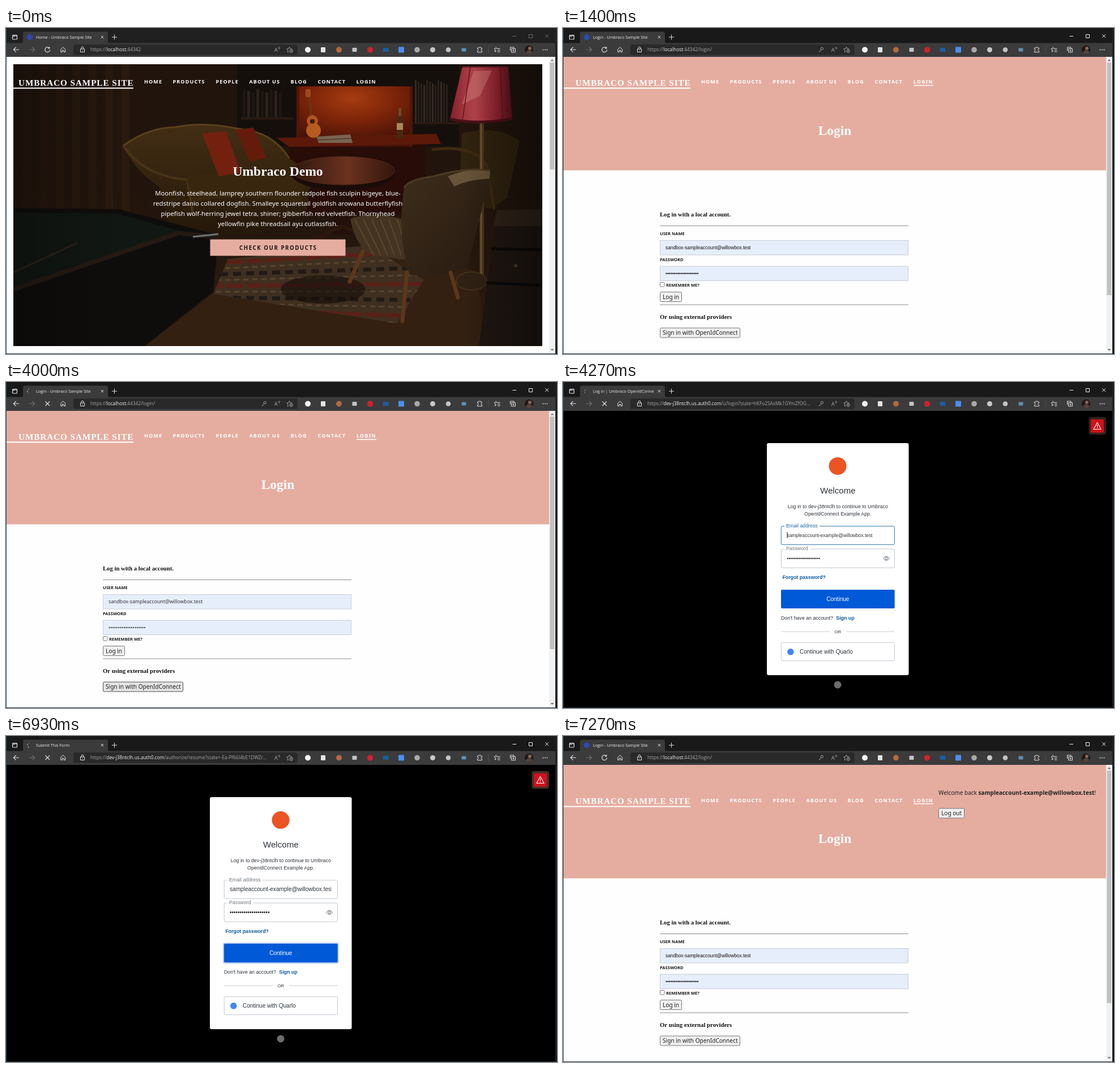
Recreate the animation shown at these times as an HTML page. Size 973 by 576 pixels, loop 8 s.

```html
<!DOCTYPE html>
<html lang="en">
<head>
<meta charset="utf-8">
<title>Sign-in walkthrough</title>
<style>
html,body{margin:0;width:100%;height:100%;overflow:hidden;background:#000}
svg{display:block;width:973px;height:576px}
text{white-space:pre}
.ns{font-family:"Noto Sans",sans-serif}
.os{font-family:"Open Sans","Noto Sans",sans-serif}
.ar{font-family:"Liberation Sans",Arial,sans-serif}
.se{font-family:"Liberation Serif",Times,serif;font-weight:700}
.b{font-weight:700}
.mid{text-anchor:middle}
</style>
</head>
<body>
<svg id="stage" viewBox="0 0 973 576" xmlns="http://www.w3.org/2000/svg"></svg>
<script>
const LOOP = 8000;
const USER = 'sandbox-sampleaccount@willowbox.test';
const MEMBER = 'sampleaccount-example@willowbox.test';
const TENANT = 'dev-j38ntclh';
const DOTS = '•'.repeat(20);
const PINK = '#e5ada0';

const text = (x, y, size, cls, fill, str, more = '') =>
  `<text x="${x}" y="${y}" font-size="${size}" class="${cls}" fill="${fill}" ${more}>${str}</text>`;
const rect = (x, y, w, h, fill, more = '') =>
  `<rect x="${x}" y="${y}" width="${w}" height="${h}" fill="${fill}" ${more}/>`;
const disc = (x, y, r, fill) => `<circle cx="${x}" cy="${y}" r="${r}" fill="${fill}"/>`;
const shape = (d, fill, more = '') => `<path d="${d}" fill="${fill}" ${more}/>`;
const line = (d, stroke, w = 1, more = '') =>
  `<path d="${d}" fill="none" stroke="${stroke}" stroke-width="${w}" ${more}/>`;
const group = (id, body, more = '') => `<g id="${id}" ${more}>${body}</g>`;
const each = (n, fn) => Array.from({length: n}, (_, i) => fn(i)).join('');

const defs = `<defs>
<linearGradient id="room" x2="0" y2="1"><stop offset="0" stop-color="#20140d"/><stop offset=".45" stop-color="#21140c"/><stop offset="1" stop-color="#2f1d10"/></linearGradient>
<radialGradient id="glow" cx=".48" cy=".2" r=".75"><stop offset="0" stop-color="#a63c10"/><stop offset=".5" stop-color="#7c2409"/><stop offset="1" stop-color="#461107"/></radialGradient>
<linearGradient id="shade" x2="1"><stop offset="0" stop-color="#82202a"/><stop offset=".4" stop-color="#b8464e"/><stop offset=".75" stop-color="#962431"/><stop offset="1" stop-color="#5d111a"/></linearGradient>
<linearGradient id="sofa" x2="0" y2="1"><stop offset="0" stop-color="#432e14"/><stop offset="1" stop-color="#241709"/></linearGradient>
<linearGradient id="seat" x2="1" y2="1"><stop offset="0" stop-color="#3d2d1b"/><stop offset="1" stop-color="#271a10"/></linearGradient>
<linearGradient id="top" x2="1"><stop offset="0" stop-color="#2c170e"/><stop offset=".55" stop-color="#6b3220"/><stop offset="1" stop-color="#33150c"/></linearGradient>
<linearGradient id="edge" x2="1"><stop offset="0" stop-color="#000" stop-opacity=".25"/><stop offset=".2" stop-color="#000" stop-opacity="0"/><stop offset=".85" stop-color="#000" stop-opacity="0"/><stop offset="1" stop-color="#000" stop-opacity=".4"/></linearGradient>
<clipPath id="hero"><rect x="13" y="64" width="934" height="498"/></clipPath>
<clipPath id="rug"><path d="M392 408L640 384 738 445 690 522 366 470Z"/></clipPath>
<clipPath id="tabClip"><rect x="50" y="6" width="110" height="20"/></clipPath>
<clipPath id="urlClip"><rect x="145" y="30" width="319" height="18"/></clipPath>
<clipPath id="mailClip"><rect x="390" y="262" width="185" height="20"/></clipPath>
</defs>`;

function room() {
  const curtain = each(7, i => rect(30 + i * 29, 64, 14, 270, '#2f1d10', `opacity="${.25 + .07 * i}"`));
  const books = each(9, i => rect(418 + i * 8, 108 + i % 3 * 3, 5, 50 - i % 3 * 3, i % 2 ? '#2b211a' : '#1d1714'))
    + each(12, i => rect(722 + i * 5, 92 + i % 4 * 3, 3, 74 - i % 4 * 3, i % 3 ? '#29201a' : '#362a20'));
  const pattern = each(6, i => line(`M355 ${416 + i * 20}L750 ${394 + i * 29}`, i % 2 ? '#211a15' : '#5a2018', 7, i % 2 ? 'stroke-dasharray="14 9"' : 'stroke-dasharray="30 5"'))
    + each(5, i => line(`M355 ${426 + i * 20}L750 ${407 + i * 29}`, '#584530', 3, 'stroke-dasharray="9 7"'));
  return rect(13, 64, 934, 498, 'url(#room)') + curtain
    + rect(408, 64, 392, 145, '#150f0c') + rect(415, 158, 92, 4, '#2a1910') + rect(720, 166, 80, 4, '#2a1910') + books
    + rect(500, 200, 240, 130, '#270c07')
    + rect(513, 103, 205, 107, 'url(#glow)') + rect(513, 103, 5, 107, '#511508') + rect(713, 103, 5, 107, '#511508')
    + shape('M478 194L760 187 768 205 500 210Z', '#5c190a')
    + line('M534 110L541 165', '#6f3216', 5) + rect(529, 108, 9, 14, '#9c4a1c', 'rx="2"')
    + disc(541, 164, 10, '#ae541f') + disc(543, 181, 13, '#b75a20') + disc(541, 165, 4, '#40170a')
    + shape('M548 192L608 188 612 203 552 203Z', '#786452') + line('M550 198L611 195', '#392318')
    + rect(690, 154, 11, 40, '#49280f', 'rx="2"') + rect(693, 141, 5, 15, '#6a4a24') + rect(690, 168, 11, 12, '#a58a5d')
    + shape('M207 208Q250 174 300 174Q350 164 410 178Q470 182 500 230L540 258 530 325 420 372 290 350 270 280Q225 250 207 208Z', 'url(#sofa)')
    + line('M207 208Q250 176 300 175Q350 165 410 178Q470 182 500 230', '#59401d', 3)
    + line('M207 208Q245 262 320 268L330 330', '#4a3317', 4)
    + shape('M318 262Q430 252 530 262L520 310Q400 290 330 308Z', '#38260f')
    + shape('M346 186L389 183 414 255 376 262Z', '#74200e') + shape('M405 180L437 176 460 230 430 236Z', '#651b0c')
    + shape('M805 186Q870 170 907 200L885 300 855 320 800 300Z', '#30230f') + line('M752 215Q830 205 850 245L862 320', '#3f2a12', 5)
    + shape('M365 470L245 562H850L830 430 700 380Z', '#332011') + shape('M392 408L640 384 738 445 690 522 366 470Z', '#3f2f20')
    + `<g clip-path="url(#rug)">${pattern}</g>`
    + '<ellipse cx="560" cy="462" rx="75" ry="25" fill="#140d09" opacity=".6"/>'
    + shape('M580 270H606L612 365H576Z', '#24100a') + line('M594 350L540 376M594 350L640 370', '#2d160c', 6)
    + '<ellipse cx="595" cy="258" rx="91" ry="29" fill="#1a0c08"/><ellipse cx="595" cy="252" rx="91" ry="25" fill="url(#top)" stroke="#54291a"/>'
    + rect(836, 165, 8, 278, '#4d371b') + rect(838, 165, 2, 278, '#776039')
    + '<ellipse cx="822" cy="447" rx="27" ry="16" fill="#302213" stroke="#584524"/>'
    + shape('M806 68H887L894 160Q838 172 784 161Z', 'url(#shade)') + shape('M826 76L858 75 837 120 805 135Z', '#d88580', 'opacity=".45"')
    + line('M784 161Q838 172 894 160', '#491017', 5) + line('M806 69H887M820 69L806 163M873 69L877 162', '#5f1520', 1.5)
    + shape('M608 337Q650 322 708 340L720 412 650 402Q618 390 608 337Z', '#443321')
    + each(6, i => line(`M${616 + i * 15} 338Q${630 + i * 14} 365 ${650 + i * 12} 402`, '#5a4730', 2))
    + shape('M703 280Q712 266 755 262Q815 245 854 251Q860 275 844 306L815 425Q770 440 713 436Q690 370 703 280Z', 'url(#seat)')
    + shape('M780 262Q820 246 855 251L854 266Q815 268 792 280Z', '#68543a')
    + line('M703 282Q712 267 755 262Q815 245 854 252', '#4d3a24', 3)
    + line('M630 395L607 448M708 432L700 518M785 432L798 476', '#5b371a', 7, 'stroke-linecap="round"')
    + shape('M13 318L200 320 375 366 366 466 245 562H13Z', '#0f0d0c') + shape('M13 326L195 328 305 358 13 462Z', '#111712')
    + line('M13 462L305 362 376 370', '#241a12', 8) + line('M330 369L375 364', '#6f7676', 3) + line('M13 432L125 380', '#30211a', 3)
    + shape('M867 322L947 320V562H835Z', '#1f1611') + shape('M867 322L947 320V350L860 350Z', '#302319')
    + line('M857 390L947 392M848 450L947 455', '#0d0907', 5) + disc(900, 420, 3, '#4d3d28')
    + rect(13, 64, 934, 498, 'url(#edge)');
}

const scrollbar = bottom => rect(959, 51, 11, 524, '#f1f1f1') + rect(960.5, 61, 8, bottom - 61, '#c1c1c1')
  + shape('M961.5 58.5L964.5 55 967.5 58.5Z', '#7d7d7d') + shape('M961.5 567L964.5 570.5 967.5 567Z', '#7d7d7d');

const nav = () => {
  const items = {HOME: 244, PRODUCTS: 294.5, PEOPLE: 370.5, 'ABOUT US': 429.5, BLOG: 502.5, CONTACT: 550.5, LOGIN: 618.7};
  return text(22, 101.8, 15.2, 'se', '#fff', 'UMBRACO SAMPLE SITE', 'letter-spacing=".95"')
    + rect(1, 105.3, 224, 2, '#fff')
    + Object.entries(items).map(([s, x]) => text(x, 98.3, 9.05, 'ns b', '#fff', s, 'letter-spacing="1.1"')).join('')
    + group('navLine', rect(619, 100.7, 35, 1.5, '#fff'));
};

const home = () => {
  const copy = ['Moonfish, steelhead, lamprey southern flounder tadpole fish sculpin bigeye, blue-',
    'redstripe danio collared dogfish. Smalleye squaretail goldfish arowana butterflyfish',
    'pipefish wolf-herring jewel tetra, shiner; gibberfish red velvetfish. Thornyhead',
    'yellowfin pike threadsail ayu cutlassfish.'];
  return rect(1, 51, 969, 524, '#fff') + `<g clip-path="url(#hero)">${room()}</g>`
    + text(480, 261, 23.6, 'se mid', '#fff', 'Umbraco Demo')
    + copy.map((s, i) => text(480, 295.5 + i * 18.07, 11.3, 'ns mid', '#fff', s)).join('')
    + rect(360.5, 373.5, 239, 29, PINK)
    + text(412, 391.5, 9.7, 'ns b', '#1b1513', 'CHECK OUR PRODUCTS', 'letter-spacing="1.53"')
    + scrollbar(250);
};

const button = (id, x, y, w, label) =>
  `<rect id="${id}" x="${x + .5}" y="${y + .5}" width="${w - 1}" height="17" rx="2" fill="#efefef" stroke="#767676"/>`
  + text(x + 5, y + 12.6, 10.1, 'ns', '#222', label);
const field = y => rect(171.5, y + .5, 438, 25.5, '#e6eefb', 'stroke="#c9ced8"');

const login = () => rect(1, 51, 969, 524, '#fefefe') + rect(1, 51, 958, 200.5, PINK)
  + text(480, 189, 23.4, 'se mid', '#fff', 'Login')
  + text(171, 332.5, 10.67, 'se', '#111', 'Log in with a local account.')
  + line('M171 349.5H610M171 489H610', '#8c8c8c')
  + text(171, 366, 7.55, 'ns b', '#1b1b1b', 'USER NAME') + field(375)
  + text(171, 412, 7.55, 'ns b', '#1b1b1b', 'PASSWORD') + field(420.5)
  + group('preview', text(181, 391, 8.35, 'ar', '#111', USER) + text(181, 436.6, 8.35, 'ar', '#111', DOTS))
  + group('filled', text(181, 391, 8.73, 'ns', '#333', USER) + text(181, 436.6, 8.73, 'ns', '#222', DOTS))
  + rect(171.5, 449.5, 7.5, 7.5, '#fff', 'rx="1.5" stroke="#767676"')
  + text(182, 457.2, 7.55, 'ns b', '#1b1b1b', 'REMEMBER ME?')
  + button('localBtn', 171, 466, 39, 'Log in')
  + text(171, 513.5, 10.75, 'se', '#111', 'Or using external providers')
  + button('oidcBtn', 171, 529.5, 142, 'Sign in with OpenIdConnect')
  + group('welcome', text(663, 103.6, 10.05, 'ns', '#222', `Welcome back <tspan font-weight="700">${MEMBER}</tspan>!`)
    + button('outBtn', 663, 127.5, 46, 'Log out'))
  + scrollbar(472);

const box = (y, h, id) => `<rect id="${id}" x="385.3" y="${y}" width="200" height="${h}" rx="2" fill="#fff" stroke="#c2c8d0"/>`;
const auth = () => rect(1, 51, 970, 524, '#000') + rect(360, 108, 250.5, 410, '#fff', 'rx="3"')
  + disc(485, 148.5, 15.5, '#eb5424')
  + text(485.3, 197, 15.1, 'ar mid', '#2d333a', 'Welcome')
  + text(485.3, 222.6, 8.8, 'ar mid', '#2d333a', `Log in to ${TENANT} to continue to Umbraco`)
  + text(485.3, 235.8, 8.8, 'ar mid', '#2d333a', 'OpenIdConnect Example App.')
  + box(254.8, 32.5, 'mailBox') + rect(391, 252, 62, 6, '#fff')
  + text(394, 256.6, 8.8, 'ar', '#6f7780', 'Email address', 'id="mailLabel"')
  + box(295, 33.3, 'passBox') + rect(391, 292, 46, 6, '#fff') + text(394, 297.4, 8.8, 'ar', '#6f7780', 'Password')
  + group('hint', text(395.5, 274, 8.38, 'ar', '#333', MEMBER) + text(395.5, 315.2, 8.38, 'ar', '#222', DOTS) + rect(395.5, 265, 1, 11, '#222'))
  + group('entered', `<g clip-path="url(#mailClip)">${text(395, 274.3, 10.1, 'ar', '#2d333a', MEMBER)}</g>` + text(395, 315.4, 10.1, 'ar', '#222', DOTS))
  + line('M565.5 311.7Q571 304.5 576.5 311.7Q571 319 565.5 311.7Z', '#65707c') + `<circle cx="571" cy="311.7" r="2" fill="none" stroke="#65707c"/>`
  + text(387.5, 348.3, 8.77, 'ar b', '#0a5c9e', 'Forgot password?')
  + group('ring', rect(383, 365, 204.5, 37.5, '#b9cff2', 'rx="3.5"'))
  + rect(385, 367, 200.7, 33, '#0059d6', 'rx="2"') + text(485.3, 386.9, 10.05, 'ar mid', '#fff', 'Continue')
  + text(385, 419.5, 8.8, 'ar', '#2d333a', "Don't have an account?") + text(482.3, 419.5, 8.8, 'ar b', '#0a5c9e', 'Sign up')
  + line('M385 441H471M500 441H585.5', '#c6cacf') + text(485.3, 444, 7.7, 'ar mid', '#2d333a', 'OR')
  + box(460.5, 32, 'otherBox') + disc(401.8, 476.8, 5.8, '#4285f4')
  + text(418, 480, 10.05, 'ar', '#2d333a', 'Continue with Quarlo')
  + disc(485, 535, 6.5, '#6c6c6c')
  + rect(928.5, 62, 30.5, 31, '#5a3a2e', 'rx="4" id="pulse"') + rect(932, 66, 23, 23.5, '#d0121b', 'rx="2"')
  + line('M943.5 71.5L950 83.5H937Z', '#fff', 1.1, 'stroke-linejoin="round"') + line('M943.5 75.5V79.5M943.5 80.7V82', '#fff', 1.1);

function chrome() {
  const white = '#e4e4e4', gray = '#a5a5a5';
  const chip = (x, fill, w = 9, h = w) => rect(x - w / 2, 38.5 - h / 2, w, h, fill, 'rx="1"');
  return rect(0, 0, 973, 27, '#1b1b1b', 'id="strip"') + rect(0, 26.5, 971, 24.5, '#3b3b3b')
    + shape('M27 27Q30 27 30 24V10Q30 6.5 33.5 6.5H176.5Q180 6.5 180 10V24Q180 27 183 27Z', '#3b3b3b')
    + line('M11.5 13.5Q11.5 12.5 12.5 12.5H18.5Q19.5 12.5 19.5 13.5V19Q19.5 20 18.5 20H12.5Q11.5 20 11.5 19ZM11.5 14H19.5M14 14V16', white, 1.2)
    + disc(41.8, 16.2, 5, '#2b49b5').replace('<circle', '<circle id="fav"')
    + group('doc', line('M38.5 11.5H43L46 14.5V21H38.5ZM43 11.5V14.5H46', white))
    + `<path id="spin" fill="none" stroke="#b5b5b5" stroke-width="1.1" d="M41 12.3A4.3 4.3 0 0 0 41 20.5"/>`
    + `<g clip-path="url(#tabClip)">${text(53, 18.9, 7.22, 'os', '#f0f0f0', '', 'id="title"')}</g>`
    + line('M167.8 14L172.2 18.4M172.2 14L167.8 18.4', '#e0e0e0') + line('M187 16.2H196M191.5 11.7V20.7', '#dedede')
    + group('controls', line('M894.5 14.5H901M923.5 11.5H929.5V17.5H923.5ZM952.2 11.2L958.2 17.2M958.2 11.2L952.2 17.2', 'currentColor', 1))
    + line('M23 38.3H13.5M17.7 34L13.4 38.3 17.7 42.6', white, 1.1) + line('M41 38.3H50.5M46.3 34L50.6 38.3 46.3 42.6', '#737373', 1.1)
    + group('reload', line('M76.4 35.2A4.4 4.4 0 1 0 77.6 38.6M76.9 33.2V36H74', white, 1.1))
    + group('stop', line('M69.5 34.5L77 42M77 34.5L69.5 42', white, 1.1))
    + line('M96.8 37.6L100.7 34 104.6 37.6V42.4H102V39.5H99.4V42.4H96.8Z', white)
    + rect(119, 29.3, 395.5, 18.3, '#292929', 'rx="2.5"')
    + line('M131.5 37H138.5V42.5H131.5ZM133 37V35.3A2 2 0 0 1 137 35.3V37M135 39.2V40.4', white)
    + `<g clip-path="url(#urlClip)">${text(149, 41.2, 8.3, 'os', gray, '', 'id="url"')}</g>`
    + group('key', line('M452 42.5L455.8 38.2M453.3 41L454.7 42.4', gray) + `<circle cx="457.3" cy="36.6" r="2.2" fill="none" stroke="${gray}"/>`)
    + text(473.8, 41.8, 9.5, 'os', gray, 'A') + line('M480.5 34Q482 35.5 480.5 37M482.3 33Q484.6 35.5 482.3 38', gray, .8)
    + line('M500.5 33.5L502 36.6 505.4 37M499 42L497.3 42.8 497.9 39.4 495.6 37 499 36.6 500.5 33.5', gray)
    + `<circle cx="503.7" cy="40.8" r="2.8" fill="none" stroke="${gray}"/>` + line('M502.2 40.8H505.2M503.7 39.3V42.3', gray, .8)
    + disc(533, 38.5, 5, '#f2f2f2') + chip(560, '#e4e4e4', 8, 9) + disc(588, 38.5, 5, '#b5693f') + chip(615.5, '#c4c4c4', 8, 7)
    + disc(643, 38.5, 5.2, '#cf222e') + chip(670.5, '#1d5c9e', 10, 7) + chip(698, '#4a8ff0', 10)
    + disc(726, 38.5, 4.8, '#a9a9a9') + disc(753.5, 38.5, 4.5, '#c9c9c9') + disc(781, 38.5, 4.3, '#c4c4c4') + chip(808.5, '#5d8fb5', 8, 6)
    + line('M832.5 35.2H835A1.6 1.6 0 0 1 838.2 35.2H840.5V37.2A1.6 1.6 0 0 0 840.5 40.4V42.8H832.5V40.4A1.6 1.6 0 0 0 832.5 37.2Z', white)
    + line('M852 32V45', '#505050')
    + line('M864.8 33.5L866.2 36.3H872.5M862 36.6L864.2 38.6 863.4 42 866.2 40.2M862 36.6L864.8 36.2M868 39.2H872.5M868 42H872.5', white)
    + line('M890.5 40V34H897V36M892.5 36.5H899.5V42.8H892.5ZM896 38V41.3M894.4 39.7H897.6', white)
    + disc(923.5, 38.5, 7.7, '#211a18') + disc(925, 36, 3, '#8c6553') + shape('M918 44Q920 38.5 925 39.5Q929 40 929.5 43.4Q924 48.5 918 44Z', '#55433c')
    + disc(948.5, 38.5, .9, white) + disc(952, 38.5, .9, white) + disc(955.5, 38.5, .9, white);
}

const stage = document.getElementById('stage');
stage.innerHTML = defs + rect(0, 0, 973, 576, '#16191c')
  + group('home', home()) + group('login', login()) + group('nav', nav()) + group('auth', auth())
  + chrome() + rect(0, 0, 1, 576, '#27485e', 'id="frame"') + rect(0, 575, 971, 1, '#1d3343') + rect(970, 0, 1, 576, '#1b2a34');

const el = {};
stage.querySelectorAll('[id]').forEach(n => el[n.id] = n);
const show = (id, on) => el[id].setAttribute('display', on ? 'inline' : 'none');
const set = (id, name, value) => el[id].setAttribute(name, value);
const put = (id, html) => { if (el[id].shown !== html) el[id].innerHTML = el[id].shown = html; };
const address = (host, path) => `https://<tspan fill="#f4f4f4">${host}</tspan>${path}`;
const within = (t, a, b) => t >= a && t < b;

function draw(t) {
  const atHome = t < 1400, atAuth = within(t, 4200, 7070), back = t >= 7070;
  const atLogin = !atHome && !atAuth;
  const loading = within(t, 930, 1400) || within(t, 3400, 5000) || within(t, 5530, 7200);
  const clicked = within(t, 3400, 4200), sent = t >= 5530, resumed = within(t, 6130, 7070);

  show('home', atHome);
  show('login', atLogin);
  show('auth', atAuth);
  show('nav', !atAuth);
  show('navLine', t >= 730);
  set('nav', 'transform', `translate(0 ${back ? 18.3 : 0})`);
  show('welcome', back);
  show('preview', !clicked);
  show('filled', clicked);
  set('oidcBtn', 'fill', within(t, 2800, 4200) ? '#e3e3e3' : '#efefef');
  set('oidcBtn', 'stroke', within(t, 2800, 4200) ? '#4f4f4f' : '#767676');

  show('hint', !sent);
  show('entered', sent);
  show('ring', sent);
  set('mailBox', 'stroke', sent ? '#c2c8d0' : '#2c76ad');
  set('mailLabel', 'fill', sent ? '#6f7780' : '#1b69a8');
  const beat = Math.cos((Math.min(t, 6730) - 5400) / 890 * 2 * Math.PI);
  set('pulse', 'opacity', (.55 - .25 * beat).toFixed(3));

  show('reload', !loading);
  show('stop', loading);
  show('fav', !loading && !atAuth);
  show('doc', !loading && atAuth);
  show('spin', loading && !atHome);
  const step = Math.floor(t / 67);
  set('spin', 'stroke-dasharray', `${1.5 + step % 3} 2.2`);
  set('spin', 'stroke-dashoffset', -(step % 5));
  show('key', !atHome && !resumed);
  set('controls', 'color', t < 930 ? '#6f6f6f' : '#f0f0f0');
  set('strip', 'fill', t < 930 ? '#202020' : '#191919');

  put('title', atHome ? 'Home - Umbraco Sample Site' : atLogin ? 'Login - Umbraco Sample Site'
    : resumed ? 'Submit This Form' : 'Log in | Umbraco OpenIdConnect Example App');
  put('url', atHome ? address('localhost', ':44342') : atLogin ? address('localhost', ':44342/login/')
    : address(TENANT + '.us.auth0.com', resumed ? '/authorize/resume?state=-Ea-Pf66I4bE1DWZr...' : '/u/login?state=hKFo2SAxMk1GYmZfOG...'));
}

function tick() {
  draw(performance.now() % LOOP);
  requestAnimationFrame(tick);
}
tick();
</script>
</body>
</html>
```
